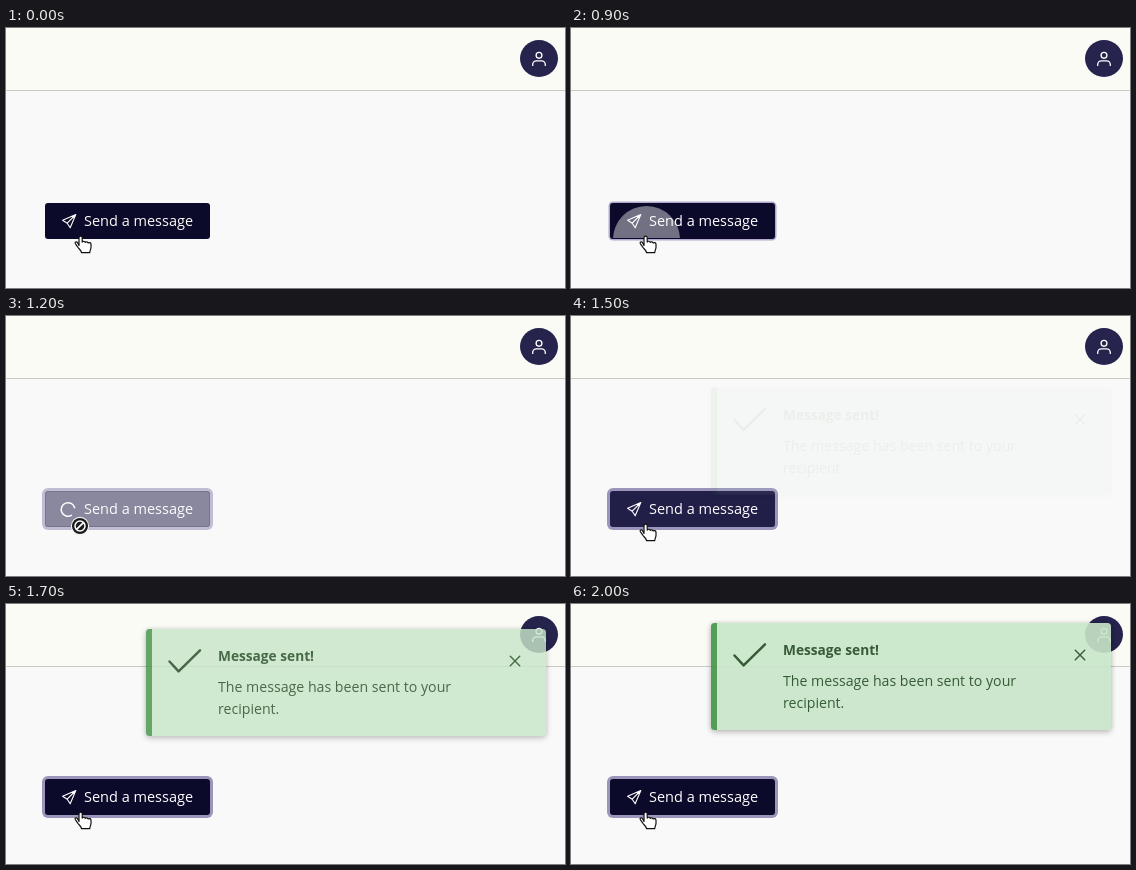
Animation of 559x260 px, one loop 3.4 s. Source, as an HTML page:

```html
<!DOCTYPE html>
<html lang="en">
<head>
<meta charset="utf-8">
<title>Send a message</title>
<style>
  html, body { margin: 0; width: 100%; height: 100%; overflow: hidden; background: #f9f9f9; }
  svg { display: block; }
  text { font-family: "Open Sans", "Noto Sans", sans-serif; }
  .line { fill: none; stroke-linecap: round; stroke-linejoin: round; }
  #label { font-size: 14.5px; }
  #toast { fill: #224a23; stroke: none; font-size: 14.15px; }
  #toast .line { fill: none; stroke: #224a23; }
  #card { filter: drop-shadow(0 2px 3px rgba(0, 0, 0, .26)) drop-shadow(0 0 2px rgba(0, 0, 0, .1)); }
  .title { font-size: 13.7px; font-weight: 700; }
</style>
</head>
<body>
<svg width="559" height="260" viewBox="0 0 559 260">
  <defs>
    <clipPath id="inside"><rect x="40" y="176" width="163" height="34" rx="2"/></clipPath>
  </defs>

  <rect width="559" height="260" fill="#f9f9f9"/>
  <rect width="559" height="62" fill="#fafbf5"/>
  <rect y="62" width="559" height="1" fill="#c9cac5"/>

  <g class="line" stroke="#fff" stroke-width="1.35">
    <ellipse cx="533" cy="30.5" rx="19" ry="18.5" fill="#26234d" stroke="none"/>
    <circle cx="533" cy="27.3" r="2.9"/>
    <path d="M526.7 37.4v-.9a3.7 3.7 0 0 1 3.7-3.7h5.2a3.7 3.7 0 0 1 3.7 3.7v.9"/>
  </g>

  <g id="button">
    <rect id="ring"/>
    <rect id="face" x="39" y="175" width="165" height="36" rx="3"/>
    <path id="plane" class="line" stroke-width="1.1"
      d="M69.8 186.5 56.6 192.2 61.2 195.2 64.2 199.8Z L61.2 195.2"/>
    <path id="spinner" class="line" stroke="#fff" stroke-width="1.5"
      d="M65.4 199.4A6.8 6.8 0 1 1 68.6 191.7"/>
    <text id="label" x="78" y="198">Send a message</text>
    <g clip-path="url(#inside)"><circle id="ripple" cx="75.5" cy="211.5" fill="#fff"/></g>
  </g>

  <g id="toast">
    <g id="card">
      <rect x="140" y="19" width="400" height="107" rx="3.5" fill="#c8e6c9"/>
      <path d="M146 19v107h-2.5a3.5 3.5 0 0 1-3.5-3.5v-100a3.5 3.5 0 0 1 3.5-3.5z" fill="#439446"/>
    </g>
    <path class="line" stroke-width="2.5" d="M163.5 51.5 172.6 61.3 194 40.3"/>
    <text class="title" x="212" y="51">Message sent!</text>
    <text x="212" y="82">The message has been sent to your</text>
    <text x="212" y="104">recipient.</text>
    <path class="line" stroke-width="1.4" d="M504.3 46.3l9.4 9.4m0-9.4l-9.4 9.4"/>
  </g>

  <path id="hand" class="line" style="fill:#fff" stroke="#111" stroke-width="1.2"
    d="M73 217.5V209.8a1.6 1.6 0 0 1 3.2 0v4.3c.3-1.2 2.7-1.1 3 .3 .5-1 2.6-.8 2.9.6 .8-.9 2.9-.4 2.9 1.3v3.2c0 1.7-1.2 2.8-1.2 5.1h-8.3c-.3-2.3-2.6-3.6-4-5.9-.9-1.5-1.7-2.4-2.2-3.2-.7-1.3.9-2.3 2-1.3z"/>
  <g id="blocked" class="line">
    <circle cx="74" cy="210" r="8.6" fill="#1b1b1b" stroke="#f4f4f4" stroke-width="1.1"/>
    <circle cx="74" cy="210" r="5" stroke="#fff" stroke-width="1.5"/>
    <path d="M70.6 213.4l6.8-6.8" stroke="#fff" stroke-width="1.7"/>
  </g>
</svg>

<script>
const LOOP = 3400;
const DARK = '#0c0a2b', HOVER = '#211e48';
const LILAC = '#9b95bb';

// Each step changes only the listed values; the rest carry over.
const steps = [
  { at: 0, text: '#fafbf5', face: DARK, ring: 0, glow: LILAC, r: 0, shine: 0, busy: false, y: 107, show: 0 },
  { at: 500, text: '#fff' },
  { at: 900, ring: 1.5, glow: '#b3a9cc', r: 33.5, shine: .42 },
  { at: 1000, ring: 3, glow: LILAC, r: 85, shine: .33 },
  { at: 1100, face: HOVER, busy: true, r: 136, shine: .23 },
  { at: 1200, r: 188, shine: .14 },
  { at: 1300, r: 206, shine: .05 },
  { at: 1400, shine: 0 },
  { at: 1500, busy: false, y: 52.5, show: .06 },
  { at: 1600, face: '#131136', y: 23.3, show: .55 },
  { at: 1700, face: DARK, y: 6, show: .82 },
  { at: 1800, y: .5, show: .89 },
  { at: 2000, y: 0, show: .9 }
];

const el = id => document.getElementById(id);
const set = (id, attrs) => {
  for (const key in attrs) el(id).setAttribute(key, attrs[key]);
};

function draw(t) {
  const s = Object.assign({}, ...steps.filter(step => step.at <= t));
  const g = s.ring;

  set('button', { opacity: s.busy ? .6 : 1 });
  set('face', { fill: s.face });
  set('ring', {
    x: 39 - g, y: 175 - g, width: 165 + 2 * g, height: 36 + 2 * g,
    rx: 3 + g, fill: s.glow, opacity: g ? 1 : 0
  });
  set('ripple', { r: s.r, opacity: s.shine });
  set('label', { fill: s.text });
  set('plane', { stroke: s.text, opacity: s.busy ? 0 : 1 });

  // One turn in two seconds, sampled every 100 ms.
  const angle = (Math.floor(t / 100) - 12) * 18;
  set('spinner', { transform: `rotate(${angle} 62 193.5)`, opacity: s.busy ? 1 : 0 });

  set('hand', { opacity: s.busy ? 0 : 1 });
  set('blocked', { opacity: s.busy ? 1 : 0 });
  set('toast', { transform: `translate(0 ${s.y})`, opacity: s.show });
}

const start = performance.now();
function tick() {
  draw((performance.now() - start) % LOOP);
  requestAnimationFrame(tick);
}
tick();
</script>
</body>
</html>
```
